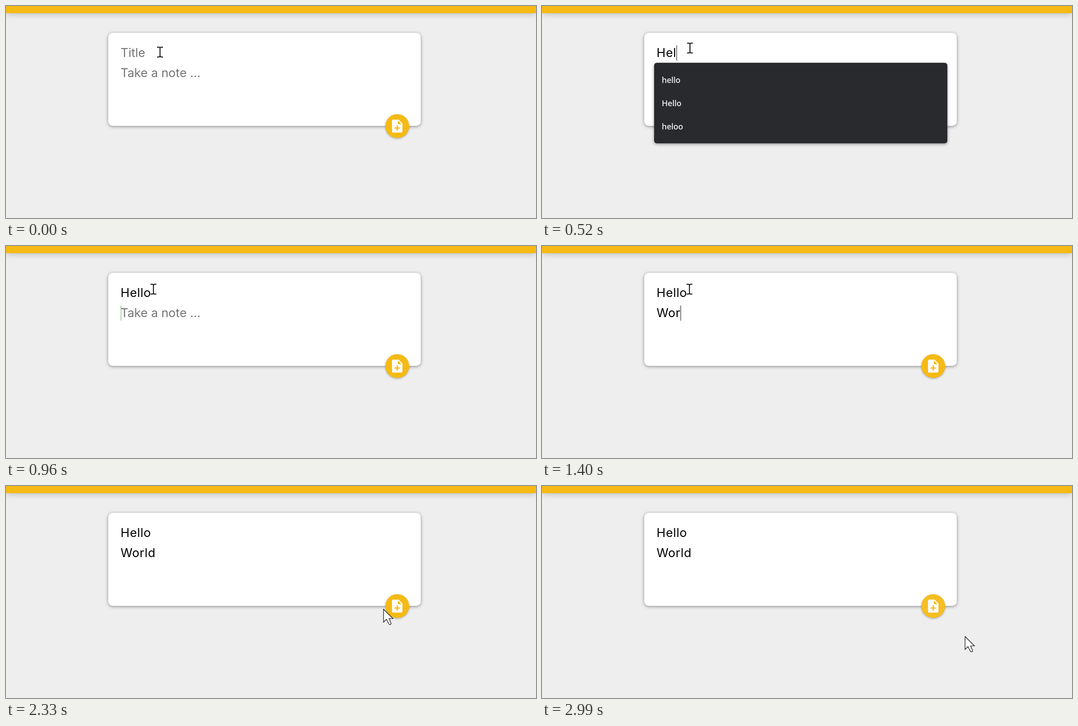
Write an HTML page that moves like this. It is 1182 px wide and 474 px high and loops after 3.11 s.

```html
<!DOCTYPE html>
<html lang="en">
<head>
<meta charset="utf-8">
<title>Note form</title>
<style>
  html, body { margin: 0; width: 100%; height: 100%; overflow: hidden; }
  body { position: relative; background: #eee; font: 27px/34px Inter, sans-serif; }
  body * { position: absolute; box-sizing: border-box; }
  .bar { left: 0; top: 0; width: 100%; height: 16px; background: #f5ba13; box-shadow: 0 0 14.5px rgba(0, 0, 0, .3); }
  .card { left: 228px; top: 60px; width: 697px; height: 208px; border-radius: 10px; background: #fff; box-shadow: 0 1.5px 7px #8a8989; }
  .field { left: 255.5px; white-space: pre; color: #000; letter-spacing: .6px; }
  .field.empty { color: #757575; letter-spacing: 0; }
  #title { top: 88px; }
  #note { top: 133px; }
  .field span { position: static; }
  .caret { top: 0; width: 1.4px; height: 34px; background: #000; }
  .empty .caret { left: .5px; }
  #note.empty .caret { background: #4caf50; }
  #add { left: 846px; top: 242px; width: 52.5px; height: 52.5px; border-radius: 50%; background: #f5ba13; box-shadow: 0 1.5px 4.4px rgba(0, 0, 0, .3); }
  #add.lit { background: #f5be22; }
  #add svg { left: 9px; top: 8.5px; width: 35px; height: 35px; fill: #fff; }
  #menu { left: 249.5px; top: 127px; padding: 12px 17.5px; border-radius: 6px; background: #292a2d; color: #e8eaed; overflow: hidden;
    font: 600 18px/52px "Open Sans", "Noto Sans", sans-serif; letter-spacing: -.25px; box-shadow: 0 2px 6px rgba(0, 0, 0, .4); }
  #menu div { position: static; height: 52px; }
  .pointer { left: 0; top: 0; width: 24px; height: 38px; overflow: visible; }
</style>
</head>
<body>
  <div class="bar"></div>
  <div class="card"></div>
  <div class="field" id="title"><span class="text"></span><i class="caret"></i></div>
  <div class="field" id="note"><span class="text"></span><i class="caret"></i></div>
  <div id="add"><svg viewBox="0 0 24 24"><path d="M14 2H6c-1.1 0-1.99.9-1.99 2L4 20c0 1.1.89 2 1.99 2H18c1.1 0 2-.9 2-2V8l-6-6zm2 14h-3v3h-2v-3H8v-2h3v-3h2v3h3v2zm-3-7V3.5L18.5 9H13z"/></svg></div>
  <div id="menu"><div>hello</div><div>Hello</div><div>heloo</div></div>
  <svg class="pointer" id="beam"><path d="M-6.5 -11H-2.5L0 -10L2.5 -11H6.5M0 -10V10M-6.5 11H-2.5L0 10L2.5 11H6.5" fill="none" stroke="#000" stroke-width="2"/></svg>
  <svg class="pointer" id="arrow"><path d="M.5 .5V29.5L7 23L12.5 33.8Q13.5 35.5 15.5 34.6Q18 33.5 17.2 31.8L12.8 21.5H21.5Z" fill="#fff" stroke="#000" stroke-width="1.2"/></svg>
<script>
const LOOP = 3110;
const el = id => document.getElementById(id);
const show = (node, on) => { node.style.visibility = on ? 'visible' : 'hidden'; };

// Each track lists [start in ms, value]; a value holds until the next start.
const title = [[0, ''], [310, 'H'], [410, 'He'], [520, 'Hel'], [620, 'Hell'], [840, 'Hello']];
const note = [[0, ''], [1060, 'W'], [1280, 'Wo'], [1400, 'Wor'], [1510, 'Worl'], [1630, 'World']];
const caret = [[0, ''], [100, 'title'], [960, 'note'], [2210, ''], [2660, 'note'], [2880, '']];
const menuRows = [[0, 0], [220, 3], [620, 2], [960, 0]];
const lit = [[0, false], [2550, true]];
const pointer = [
  [0, ['beam', 343.5, 103]], [100, ['beam', 342.5, 101]], [220, ['beam', 341.5, 98]],
  [310, ['beam', 338, 94]], [410, ['beam', 333, 91]], [520, ['beam', 330, 94]],
  [620, ['beam', 328.8, 96.5]], [1740, ['beam', 355, 102]], [1860, ['beam', 444, 160]],
  [2000, ['beam', 540, 184]], [2100, ['beam', 670, 222]], [2210, ['arrow', 790, 262]],
  [2330, ['arrow', 841.5, 275]], [2450, ['arrow', 866, 270]], [2770, ['arrow', 882, 286]],
  [2880, ['arrow', 918, 316]], [2990, ['arrow', 943, 336]]
];

const at = (track, t) => track.filter(([start]) => start <= t).pop()[1];

function setField(id, value, hint, focused) {
  const field = el(id);
  field.classList.toggle('empty', !value);
  field.querySelector('.text').textContent = value || hint;
  show(field.querySelector('.caret'), focused);
}

function draw() {
  const t = performance.now() % LOOP;
  const focus = at(caret, t);
  setField('title', at(title, t), 'Title', focus === 'title');
  setField('note', at(note, t), 'Take a note ...', focus === 'note');

  const rows = at(menuRows, t);
  const menu = el('menu');
  show(menu, rows > 0);
  menu.style.width = (rows === 3 ? 654.5 : 653) + 'px';
  menu.style.height = 24 + rows * 52 + 'px';

  el('add').classList.toggle('lit', at(lit, t));

  const [kind, x, y] = at(pointer, t);
  for (const id of ['beam', 'arrow']) show(el(id), id === kind);
  el(kind).style.transform = `translate(${x}px, ${y}px)`;
  requestAnimationFrame(draw);
}
draw();
</script>
</body>
</html>
```
